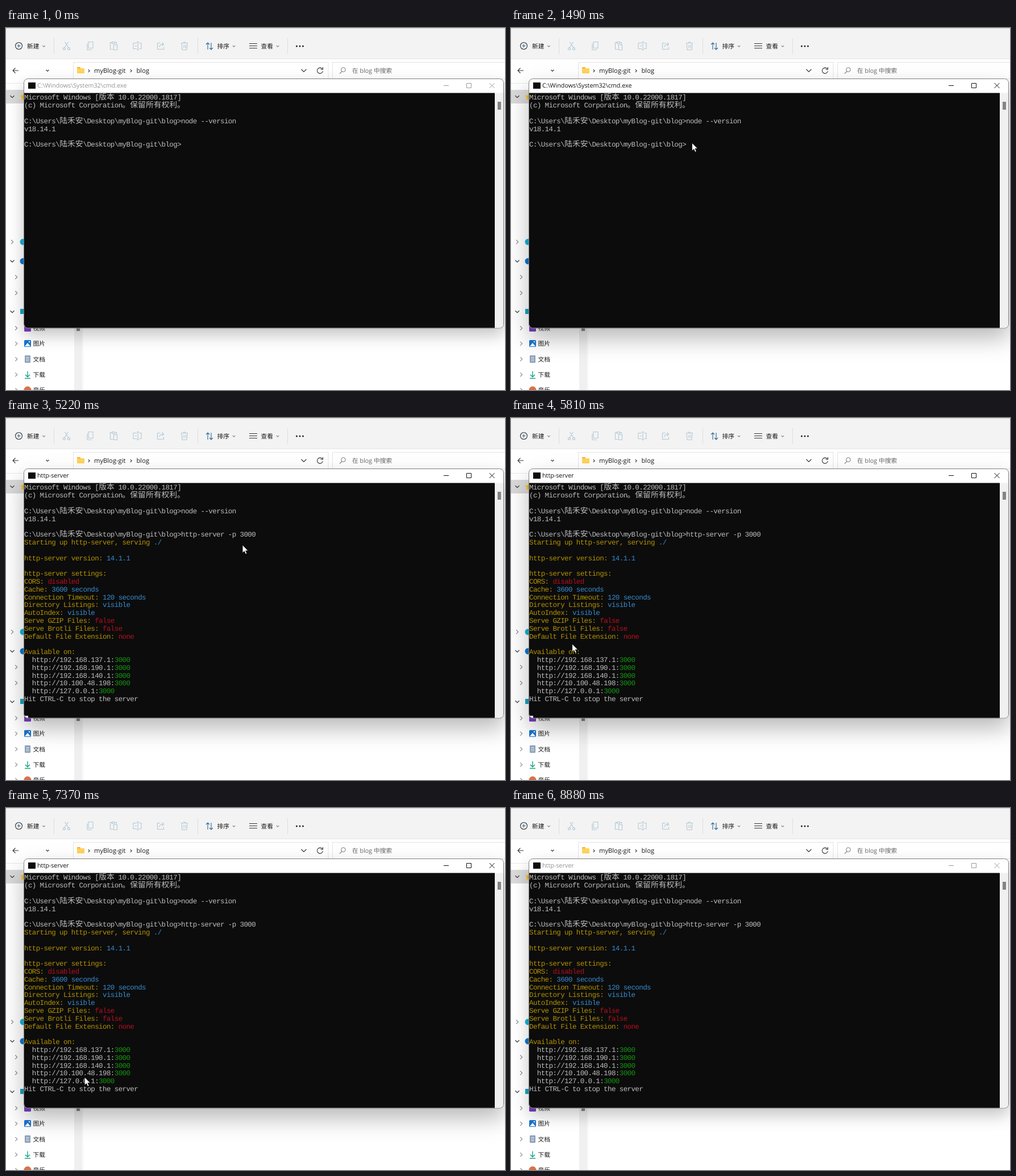
Animation, 878 px wide and 638 px high, one loop 8960 ms. Source, as an HTML page:

```html
<!DOCTYPE html>
<html lang="zh">
<head>
<meta charset="utf-8">
<title>http-server</title>
<style>
html, body { margin: 0; width: 100%; height: 100%; overflow: hidden; background: #fff; }
svg { display: block; width: 878px; height: 638px; }
text { white-space: pre; text-rendering: geometricPrecision; }
.ui { font: 10.75px "Open Sans", "Noto Sans", "Noto Sans CJK SC", "Noto Sans CJK", sans-serif; fill: #1a1a1a; }
.path { font-size: 11.2px; }
.hint { fill: #666; }
.term { font: 12.5px "Liberation Mono", monospace; letter-spacing: -0.6px; fill: #ccc; opacity: .92; }
.cjk { font: 300 13.8px "Noto Sans CJK SC", "Noto Sans CJK", sans-serif; letter-spacing: 0; }
.line { fill: none; stroke: #333; stroke-width: 1.1; }
.grey { stroke: #888; }
.pale { stroke: #b3c9d8; }
.blue { stroke: #27679a; }
.green { stroke: #14a085; stroke-width: 1.4; }
.white { stroke: #eef3f8; }
#frame { filter: drop-shadow(0 18px 19px rgba(0,0,0,.27)); }
#frame.idle { filter: drop-shadow(0 12px 14px rgba(0,0,0,.23)); }
</style>
</head>
<body>
<svg id="stage" viewBox="0 0 878 638"></svg>
<script>
const LOOP = 8960, CELL = 6.9, ROW = 13.8, LEFT = 32, BLINK = 530;
const USER = '陆禾安';
const CMD = 'C:\\Windows\\System32\\cmd.exe';
const PROMPT = `C:\\Users\\${USER}\\Desktop\\myBlog-git\\blog>`;
const SCRIPT = `C:\\Users\\${USER}\\AppData\\Roaming\\npm\\\\node_modules\\http-server\\bin\\http-server`;

const rect = (x, y, w, h, fill, more = '') =>
  `<rect x="${x}" y="${y}" width="${w}" height="${h}" fill="${fill}" ${more}/>`;
const dot = (x, y, r, fill) => `<circle cx="${x}" cy="${y}" r="${r}" fill="${fill}"/>`;
const label = (x, y, s, cls = '', id = '') => `<text id="${id}" class="ui ${cls}" x="${x}" y="${y}">${s}</text>`;
// Stroked icon, drawn around its centre
const icon = (x, y, d, cls = '') => `<path class="line ${cls}" transform="translate(${x} ${y})" d="${d}"/>`;
const down = (x, y, r, cls) => icon(x, y, `M${-r} ${-r / 2}l${r} ${r}l${r} ${-r}`, cls);
const right = (x, y, r, cls) => icon(x, y, `M${-r / 2} ${-r}l${r} ${r}l${-r} ${r}`, cls);

const RING = r => `M${-r} 0a${r} ${r} 0 1 0 ${2 * r} 0a${r} ${r} 0 1 0 ${-2 * r} 0`;
const ARROW = 'M5 0H-5M-.5-4.500L-5 0l4.500 4.500';
const EDITS = [
  'M-3-7L4 4M3-7L-4 4M-6 5a2 2 0 1 0 4 0a2 2 0 1 0-4 0M2 5a2 2 0 1 0 4 0a2 2 0 1 0-4 0',
  'M-3-7h8V4h-8zM-5-4V7H3',
  'M-2-6h-4V6h5M2-6h3v3M-3-7h5v3h-5zM0-2h6v9H0z',
  'M-1-5h-6V5h6M3-5h4V5H3M1-7V7M-1-7h4M-1 7h4M-4 0h3',
  'M-1-5h-5V6H5V2M-3 2q1-5 8-5M2-6l3 3l-3 3',
  'M-6-5H6M-5-5l1 12h8l1-12M-2-5q2-4 4 0M-1-2v6M2-2v6'];

function toolbar() {
  const menu = (x, s) => label(x, 35.5, s) + down(x + 29.5, 32, 2.3, 'grey');
  return rect(0, 0, 878, 54, '#f3f3f3') + rect(0, 0, 878, 1, '#d0d0d0') + rect(0, 54, 878, 1, '#e5e5e5') +
    [84, 337, 495].map(x => rect(x, 18, 1, 28, '#dedede')).join('') +
    icon(22.5, 31.5, RING(6)) + icon(22.5, 31.5, 'M-3 0h6M0-3v6', 'blue') + menu(37, '新建') +
    EDITS.map((d, i) => icon(106.5 + 41.5 * i, 31.5, d, 'pale')).join('') +
    icon(358, 32, 'M-3 6V-6M-6-3l3-3l3 3M3-6V6M0 3l3 3l3-3', 'blue') + menu(371.5, '排序') +
    icon(435, 31.5, 'M-7-4H7M-7 0H7M-7 4H7') + menu(448.5, '查看') +
    [-1, 0, 1].map(i => dot(517 + 5.5 * i, 32, 1.5, '#222')).join('');
}

function addressBar() {
  const box = (x, w) => rect(x, 60.5, w, 29, '#fff', 'stroke="#e3e3e3"');
  return icon(17, 75, ARROW) + icon(48, 75, ARROW + '" style="rotate:180deg', 'grey') +
    down(73, 75, 2.5) + icon(100, 75.5, ARROW + '" style="rotate:90deg') +
    box(118.5, 448.5) + box(574.5, 310) +
    rect(125, 69, 6, 5, '#f2b02e', 'rx="1"') + rect(125, 71, 13, 9, '#ffd35c', 'rx="1"') +
    right(146, 75.5, 2.4) + label(155, 79, 'myBlog-git', 'path') +
    right(220, 75.5, 2.4) + label(229.5, 79, 'blog', 'path') +
    down(524, 75, 4.5) + icon(552.5, 75, 'M4-3a5 5 0 1 0 1 4M5-6v4H1') +
    icon(593.5, 73.5, RING(3.7) + 'M-2.500 3l-4 4', 'grey') +
    label(609, 79.2, '在 blog 中搜索', 'hint') + rect(0, 97, 878, 1, '#e8e8e8');
}

function sidebar() {
  const folders = ['视频', '图片', '文档', '下载', '音乐'].map((s, i) => {
    const y = 529 + 27.3 * i;
    return right(18, y, 3.5, 'grey') + label(47.5, y + 4, s);
  });
  return rect(0, 109, 36, 24, '#d9d9d9') + [121, 411, 500].map(y => down(11, y, 3.5)).join('') +
    right(11, 377, 3.5, 'grey') + right(18, 439, 3.5, 'grey') + right(18, 467, 3.5, 'grey') +
    '<path d="M31 115l2 4h4l-3 3l1 5l-4-2.500l-4 2.500l1-5l-3-3h4z" fill="#f9bd12"/>' +
    dot(30, 377, 5.5, '#17b3d4') + dot(30, 411, 5.5, '#0f78d0') + rect(25, 495, 12, 9, '#1ba3bf') +
    rect(120, 500, 14, 138, '#f0f0f0') + rect(124, 500, 6, 34, '#858585') + rect(135, 500, 1, 138, '#f3f3f3') +
    folders.join('') + rect(32, 523, 12, 12, '#7a3fc0', 'rx="1.500"') +
    rect(32, 550, 12, 12, '#1976cf', 'rx="1.500"') + '<path d="M33 561l5-6l5 6z" fill="#fff"/>' + dot(41, 553, 1.2, '#fff') +
    rect(33, 577, 10, 13, '#8ba0b8', 'rx="1"') + icon(38, 583.5, 'M-3-3h6M-3 0h6M-3 3h6', 'white') +
    icon(38, 611, 'M0-6V3M-4 0l4 4l4-4M-5 6.500H5', 'green') + dot(38, 638, 6.5, '#d8734c');
}

const COLORS = { w: '#ccc', y: '#c19c00', b: '#3a96dd', r: '#c50f1f', g: '#13a10e' };

// Runs are separated by "|"; each starts with its colour key
function row(n, src) {
  const runs = src.split('|').map(run => {
    const body = run.slice(1).replace(/[\u3000-\u9fff]+/g, s => `<tspan class="cjk">${s}</tspan>`);
    return `<tspan fill="${COLORS[run[0]]}">${body}</tspan>`;
  });
  return `<text class="term" x="${LEFT}" y="${126.4 + n * ROW}">${runs.join('')}</text>`;
}
const rows = (from, list) => list.map((s, i) => s && row(from + i, s)).join('');

const HEAD = ['wMicrosoft Windows [版本 10.0.22000.1817]', 'w(c) Microsoft Corporation。保留所有权利。', '',
  `w${PROMPT}node --version`, 'wv18.14.1', '', 'w' + PROMPT];
const HOSTS = ['192.168.137.1', '192.168.190.1', '192.168.140.1', '10.100.48.198', '127.0.0.1'];
const OUTPUT = ['yStarting up http-server, serving |b./', '', 'yhttp-server version: |b14.1.1', '',
  'yhttp-server settings: ', 'yCORS: |rdisabled', 'yCache: |b3600 seconds',
  'yConnection Timeout: |b120 seconds', 'yDirectory Listings: |bvisible', 'yAutoIndex: |bvisible',
  'yServe GZIP Files: |rfalse', 'yServe Brotli Files: |rfalse', 'yDefault File Extension: |rnone', '',
  'yAvailable on:', ...HOSTS.map(h => `w  http://${h}:|g3000`), 'wHit CTRL-C to stop the server'];

function terminal() {
  return rect(31.5, 89.5, 844, 439.5, '#fff', 'id="frame" rx="7" stroke="#808080"') +
    '<clipPath id="clip"><rect x="32" y="90" width="843" height="438.500" rx="6.500"/></clipPath><g clip-path="url(#clip)">' +
    rect(32, 114.5, 828, 415, '#0c0c0c') + rect(860, 114.5, 16, 415, '#f0f0f0') +
    rect(865, 130, 6, 14, '#858585') + rect(39, 96, 13, 11, '#0c0c0c') + label(55, 105, '', '', 'title') +
    '<path id="buttons" fill="none" d="M770 101.500h9M810.500 97.500h8v8h-8zM850.500 97l9 9M859.500 97l-9 9"/>' +
    rows(0, HEAD) +
    `<text id="command" class="term" x="${LEFT + 40 * CELL}" y="${126.4 + 6 * ROW}">http-server -p 3000</text>` +
    `<g id="output">${rows(7, OUTPUT)}</g>` + rect(0, 0, 7, 4, '#f2f2f2', 'id="caret"') + '</g>';
}

const $ = id => document.getElementById(id);
$('stage').innerHTML = toolbar() + addressBar() + sidebar() + terminal() +
  '<path id="pointer" d="M.5.5V14.500l3.200-3l2.200 5l2.300-1l-2.200-4.900h4.400z" fill="#fff" stroke="#000" stroke-width=".7"/>';

const TITLES = [[0, CMD], [1580, '选择' + CMD], [2400, CMD],
  [3460, `${CMD} - "node"   "${SCRIPT}" -p 3000`], [4690, 'http-server']];

// Time, cell, row, start of the blinking
const CARET = [[2090, 40, 6, 2090], [2420, 59, 6, 2090], [3440, 0, 7, 2090], [4700, 0, 29, 4700]];

// Time, x, y
const PATH = [[40, 850, 632], [520, 580, 378], [780, 360, 275], [920, 318, 202], [1490, 318, 202],
  [1720, 320, 205], [2600, 320, 205], [2870, 437, 211], [3150, 423, 215], [5200, 423, 215], [5220, 416, 223],
  [6030, 60, 420], [6250, 180, 414], [6490, 83, 462], [6700, 45, 474], [7040, 170, 474],
  [7370, 138, 474], [7600, 62, 477], [7950, 112, 478], [8670, 847, 637]];
const HIDDEN = [[0, 40], [2400, 2620], [3930, 4700], [8670, LOOP]];

const last = (table, t) => table.filter(step => step[0] <= t).pop();

const slope = (i, axis) => (PATH[i + 1][axis] - PATH[i][axis]) / (PATH[i + 1][0] - PATH[i][0]);

// Harmonic mean of both slopes: smooth, never overshoots, rests at turns
function tangent(i, axis) {
  if (i === 0 || i === PATH.length - 1) return 0;
  const a = slope(i - 1, axis), b = slope(i, axis);
  return a * b > 0 ? 2 * a * b / (a + b) : 0;
}

function along(t, axis) {
  const next = PATH.findIndex(p => p[0] > t);
  if (next < 1) return PATH.at(next)[axis];
  const i = next - 1, span = PATH[next][0] - PATH[i][0], k = (t - PATH[i][0]) / span;
  const ease = k * k * (3 - 2 * k);
  return PATH[i][axis] * (1 - ease) + PATH[next][axis] * ease +
    span * k * (1 - k) * (tangent(i, axis) * (1 - k) - tangent(next, axis) * k);
}

const show = (id, on) => $(id).setAttribute('visibility', on ? 'visible' : 'hidden');
const move = (id, x, y) => $(id).setAttribute('transform', `translate(${x} ${y})`);

function drawCaret(t) {
  const spot = last(CARET, t);
  show('caret', spot && Math.floor((t - spot[3]) / BLINK) % 2 === 0);
  if (spot) move('caret', LEFT + spot[1] * CELL, 124.6 + spot[2] * ROW);
}

function draw(t) {
  const idle = t < 970 || t >= 8880;
  $('frame').setAttribute('class', idle ? 'idle' : '');
  $('title').style.fill = idle ? '#929292' : '#111';
  $('buttons').setAttribute('stroke', idle ? '#9a9a9a' : '#111');
  $('title').textContent = last(TITLES, t)[1];
  show('command', t >= 2420);
  show('output', t >= 4700);
  drawCaret(t);
  show('pointer', !HIDDEN.some(([a, b]) => t >= a && t < b));
  move('pointer', along(t, 1), along(t, 2));
}

const start = performance.now();
function tick() {
  draw((performance.now() - start) % LOOP);
  requestAnimationFrame(tick);
}
tick();
</script>
</body>
</html>
```
